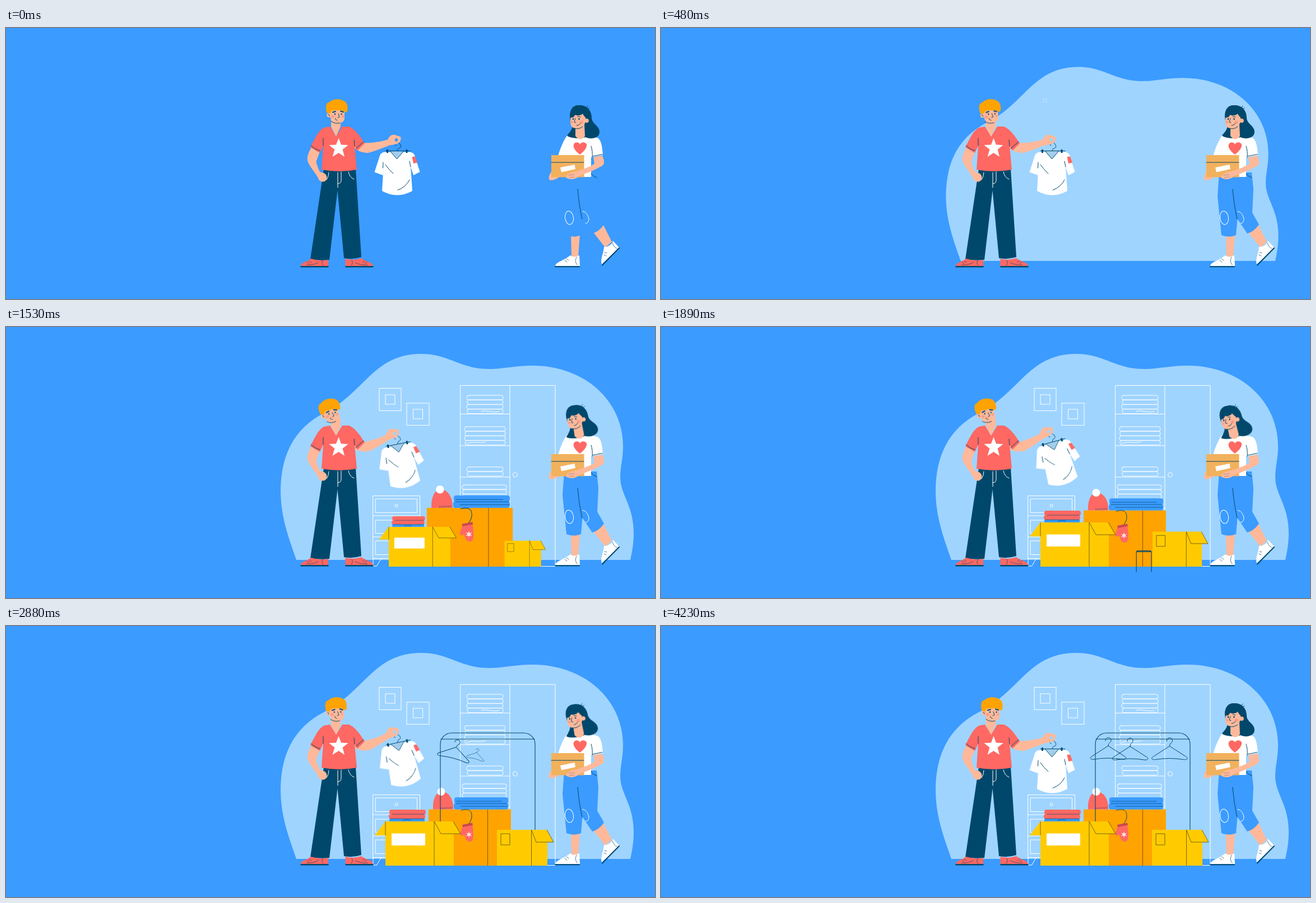
Animation, 1158 px wide and 484 px high, one loop 4500 ms. Source, as an HTML page:

```html
<!DOCTYPE html>
<html lang="en">
<head>
<meta charset="utf-8">
<title>Sorting clothes</title>
<style>
  html, body { margin: 0; width: 100%; height: 100%; overflow: hidden; background: #3b9bff; }
  svg { display: block; width: 100%; height: 100%; }
  .navy { fill: #00486b; }
  .coral { fill: #ff6863; }
  .skin { fill: #ffb99a; }
  .white { fill: #fff; }
  .blue { fill: #3b9bff; }
  .orange { fill: #ffa300; }
  .yellow { fill: #ffcb00; }
  .ink { fill: none; stroke: #00486b; stroke-width: 1; stroke-linecap: round; stroke-linejoin: round; }
  .chalk { fill: none; stroke: #fff; stroke-width: 1; stroke-linecap: round; }
  .edge { fill: none; stroke: #5a4a10; stroke-width: .8; }
  .thin { stroke-width: .7; }
  .bold { stroke-width: 2; }
  .rail { stroke-width: 1.1; vector-effect: non-scaling-stroke; }

  .sway { animation: 4500ms infinite; animation-timing-function: cubic-bezier(.37, 0, .63, 1); }
  #manHead { transform-origin: 588px 200px; animation-name: manHead; }
  #forearm { transform-origin: 640px 212px; animation-name: forearm; }
  #heldShirt { transform-origin: 700px 200px; animation-name: heldShirt; }
  #womanHead { transform-origin: 1030px 203px; animation-name: womanHead; }
  @keyframes manHead {
    0% { transform: rotate(0deg); }
    32% { transform: rotate(-13.5deg); }
    73%, 100% { transform: rotate(0deg); }
  }
  @keyframes forearm {
    0%, 10.5% { transform: rotate(0deg); }
    49% { transform: rotate(-15deg); }
    92%, 100% { transform: rotate(0deg); }
  }
  @keyframes heldShirt {
    0%, 10.5% { transform: rotate(0deg); }
    49% { transform: rotate(-1.5deg); }
    92%, 100% { transform: rotate(0deg); }
  }
  @keyframes womanHead {
    0%, 10.5% { transform: rotate(0deg); }
    49% { transform: rotate(-12.5deg); }
    92%, 100% { transform: rotate(0deg); }
  }
</style>
</head>
<body>
<!-- data-pop: start in ms, then the point it grows from -->
<svg viewBox="0 0 1158 484" preserveAspectRatio="none">
  <defs>
    <path id="hanger" class="ink" d="M-5 -9C-6 -16 5 -17 5 -10C5 -5 0 -6 0 0L-28 18C-35 22 -31 25 -25 24Q0 20 25 24C31 25 35 22 28 18L0 0"/>
  </defs>

  <path data-pop="0 805 416" fill="#9fd4ff" d="M518 416C505 378 490 340 490 293C490 222 520 178 567 154C640 118 655 48 741 48C790 48 810 75 862 75C890 75 905 69 940 69C1030 69 1101 130 1101 213C1101 235 1096 250 1096 268C1096 300 1120 318 1120 368C1120 387 1117 402 1114 416Z"/>

  <g class="chalk">
    <rect data-pop="365 685.5 129.5" x="677" y="121" width="17" height="17"/>
    <rect data-pop="618 685.5 129.5" x="666" y="109.5" width="39" height="40"/>
    <rect data-pop="450 735 155.5" x="726.5" y="147" width="17" height="17"/>
    <rect data-pop="760 735 155.5" x="715" y="136" width="40" height="39.5"/>

    <g data-pop="760 697 364">
      <path d="M655 301.5H738.5V413.5H655ZM655 337H738.5M655 375H738.5M655 413V427H661.5L669.5 413.5"/>
      <path d="M659.5 307H733.5V331.5H659.5ZM659.5 345H733.5V368.5H659.5ZM659.5 382H733.5V406.5H659.5Z"/>
      <circle cx="696.5" cy="319" r="2.5"/>
    </g>

    <g data-pop="877 896 427" id="wardrobe">
      <path d="M811 104.5H980V427.5H811ZM899 104.5V427M811 155.5H899M811 212H899M811 268H899M811 323.5H899"/>
      <path d="M848 151C856 147 866 154 880 151M822 208C836 203 842 209 856 205"/>
      <circle cx="908.5" cy="264" r="4"/>
    </g>
  </g>

  <g data-pop="1190 827 428">
    <path class="orange" d="M754 327.5H901V428H754Z"/>
    <path class="edge" d="M859.5 327.5V428"/>
    <rect class="blue" x="800" y="306" width="96" height="11" rx="4"/>
    <rect class="blue" x="799" y="316" width="97" height="11.5" rx="4"/>
    <path class="ink thin" d="M804 313H884M803 317H894M811 322H895"/>
    <path class="coral" d="M762 327.5C761 310 767 296 778 296C790 296 799 310 798 327.5Z"/>
    <path class="ink thin" d="M776 324.5V326.5M779 324.5V326.5M782 324.5V326.5M785 324V326M788 324V326M791 324V326M794 323.5V325.5"/>
    <circle class="white" cx="776.5" cy="296" r="7"/>
    <path class="ink" d="M812 329C828 325 831 331 831 340C831 346 828 350 825 354"/>
    <path class="coral" d="M815 357C813 364 810 369 811 373C813 376 817 374 818 372C819 380 823 386 829 385C836 383 834 368 832 353Z"/>
    <path fill="#c9474f" d="M814 355L832 351.5L833 355.5L815 359Z"/>
    <path class="chalk" d="M826 368V377M821.8 370.2L830.2 374.8M830.2 370.2L821.8 374.8"/>
    <circle class="chalk" cx="826" cy="372.5" r="2.2"/>
  </g>

  <g data-pop="1815 862 439">
    <path class="ink rail" d="M775 428V211A20 20 0 0 1 795 191H924A20 20 0 0 1 944 211V428M776 202H943"/>
  </g>
  <g data-pop="2480 798 236" data-swing><use href="#hanger" x="798" y="214"/></g>
  <g data-pop="2743 837 237" data-swing><use href="#hanger" x="837" y="215"/></g>
  <g data-pop="3010 907.5 236" data-swing><use href="#hanger" x="907.5" y="214.5"/></g>

  <g data-pop="1100 736 428">
    <rect class="blue" x="684" y="342" width="63" height="9" rx="3"/>
    <rect class="coral" x="684" y="328" width="65" height="8.5" rx="3.5"/>
    <rect class="coral" x="683" y="336" width="65" height="8" rx="3.5"/>
    <path class="ink thin" d="M689 336H746M686 344.5H746M708 347.5Q714 345 722 347"/>
    <path class="yellow" d="M677 349H798L811 371H799V428H677V374H658Z"/>
    <path class="edge" d="M677 349V374M764 428V349L776 371H811L798 349"/>
    <rect class="white" x="688" y="370.5" width="60" height="21.5"/>
  </g>

  <g data-pop="1360 925 428">
    <path class="yellow" d="M876 364H965L977 386H966V428H876Z"/>
    <path class="edge" d="M937.5 428V364L946 386H977L965 364M883 371H899V391H883Z"/>
  </g>

  <g id="woman">
    <path class="skin" d="M1008 368L1024 368L1021 409L1009 410ZM1048 365L1066 352L1081 382L1069 392Z"/>
    <path class="white" d="M980 425C981 418 996 415 1007 406Q1013 411 1023 406L1024 425ZM1067 391C1075 391 1082 386 1083 380L1094 392L1063 422C1060 413 1066 404 1067 391Z"/>
    <path class="ink bold" d="M980 426.3H1023M1064 423.5L1094 393"/>
    <path class="ink thin" d="M1000 412L1004 415M997 415L1001 418M1018 409Q1014 417 1019 423M1068 401L1072 402M1067 405L1071 407M1082 384Q1084 391 1090 394"/>
    <path class="blue" d="M996 258L993 300L1000 370Q1014 375 1026 370L1028.5 341L1046 367Q1058 364 1067 351L1055 330L1057 288L1054 258Z"/>
    <path class="ink" d="M1020 288C1022 310 1025 328 1028 341M1043 258Q1046 265 1054 267"/>
    <ellipse class="chalk" cx="1005" cy="339" rx="7.5" ry="12" transform="rotate(-8 1005 339)"/>
    <path class="chalk" d="M1029 327.5C1036 328 1039 336 1040 341C1040 346 1037 350 1034 348.5"/>
    <path class="white" d="M1002 191C995 200 989 214 984 232L1000 250V266H1044V231L1065 227C1064 212 1062 199 1055 196L1036 192L1024 198L1014 192Z"/>
    <path class="ink" d="M1047 229L1064 225.5M1044 211Q1047 220 1046 231"/>
    <path class="coral" d="M1024 226C1016 220 1011 213 1013 208C1015 203 1022 203 1024 208C1026 203 1034 203 1036 208C1037 214 1031 221 1024 226Z"/>
    <path class="skin" d="M974 256C968 263 967 270 971 272C978 272 984 269 988 265L986 256Z"/>
    <rect x="973" y="227" width="58.5" height="39.5" fill="#f2b15d"/>
    <path class="ink" d="M973 240H1031"/>
    <path class="white" d="M989 249L1014.5 244L1016 252L991 257.5Z"/>
    <path class="skin" d="M1048 231L1064 228C1068 238 1068 243 1064 246C1050 254 1035 260 1023 264C1015 272 1005 271 999 267C1000 261 1009 257 1018 256C1030 252 1043 248 1050 242Z"/>
    <path class="ink thin" d="M1004 263L1014 262M1005 267L1014 266" opacity=".5"/>
    <g id="womanHead" class="sway">
      <path class="navy" d="M1007 165C1004 148 1010 138 1022 138C1036 137 1045 147 1045 160C1045 172 1060 174 1059 187C1057 198 1042 199 1034 195C1022 199 1004 196 1001 192C1006 186 1010 182 1011 174Z"/>
      <path class="skin" d="M1016 175L1032 172L1033 193Q1025 204 1016 193Z"/>
      <path class="skin" d="M1008 152H1034V166C1033 175 1025 180 1018 179.5C1010 179 1007 175 1007 167Z"/>
      <circle class="skin" cx="1036" cy="165.5" r="3.8"/>
      <path class="navy" d="M1006 160C1006 144 1013 138 1022 138C1036 138 1044 146 1044 160L1038 162C1033 160 1031 157 1029 153C1025 157 1019 157 1016 155C1013 159 1010 160 1006 160Z"/>
      <path class="ink" d="M1034 143Q1037 142 1038 139M1036 145L1041 143M1010 159.5L1013 158.5M1020 158L1025 159M1016 161L1014 168L1017 169M1018 174Q1023 174 1025 170M1014 179Q1022 182 1029 176"/>
      <path class="navy" d="M1011 161H1013V164H1011ZM1021.5 161H1023.5V164H1021.5Z"/>
      <circle class="coral" cx="1027" cy="168" r="2.8" opacity=".4"/>
      <circle class="coral" cx="1010" cy="168" r="2" opacity=".4"/>
    </g>
  </g>

  <g id="man">
    <g id="forearm" class="sway">
      <g id="heldShirt" class="sway">
        <path class="ink" d="M694 205Q693 209 696 210M701 205C707 211 705 214 701 215Q698 216 698 219M677 219.5H721"/>
        <path class="white" d="M676 221.5Q669 222 667 228L657.5 257.5L672.5 263L673.5 250L671 291Q698 306 725 291L722 248L727 263L738.5 257L729 227Q727 222 720 221.5Z"/>
        <path d="M686 220.5L697.5 234L709 220.5Z" fill="#a3cdec"/>
        <path class="ink" d="M686 220.5L697.5 234L709 220.5M677 244Q683 253 691 260M699 289.5Q714 284 720 271M673 240L672.5 250M720 238L722 248"/>
        <path class="coral" d="M724.5 230L730 229.5L734 240.5L727 242Z"/>
        <path class="navy" d="M679 217H682V223H679ZM713.5 217H716.5V223H713.5Z"/>
      </g>
      <path class="skin" fill-rule="evenodd" d="M622 205L638 205C650 206 668 203 681 199.5C684 193 688 190 693 190.5C698 193 703 193 704.5 195C705 200 703 205 699 206C694 209 688 208 683 210C670 215 658 220 646 223C638 223 630 221 622 215ZM696 196.5C693 197 693 202 696 203C700 203.500 701 197.500 696 196.5Z"/>
    </g>
    <path class="navy" d="M567 252L543 413Q560 416 577 414L591.5 290L603 411Q618 414 634 409L624 252Z"/>
    <path class="chalk" d="M611 257Q613 267 621 270M576 258Q576 265 572 271M592 258V285M598 257V272Q598 278 592 278"/>
    <path class="skin" d="M545 213C538 225 536 233 539 240C545 252 553 260 557 268C559 275 566 276 570 273C574 268 573 262 567 259L560 257C556 248 553 241 554 237L560 221Z"/>
    <path class="coral" d="M526 425C526 419 537 418 544 412Q560 417 575 414V425ZM605.5 425V412Q620 416 634 411C641 417 654 418 655 425Z"/>
    <path class="navy" d="M525.5 425H575.5V427.5H525.5ZM605.5 425H655.5V427.5H605.5Z"/>
    <path class="ink thin" d="M541 416L545 419M537 418L541 421M565 415Q562 421 566 424M640 415L636 419M644 417L640 421M617 415Q620 420 616 424M623 419Q632 424 645 423M557 419Q548 424 536 423"/>
    <path class="coral" d="M578 176L567 178C556 184 549 202 543 213L560 223L566 210L563 253Q594 259 626 253L622 211L627 219L640 206C632 193 622 180 612 176H600L589 194Z"/>
    <path class="ink" d="M544.5 210Q551 217 560 219M638 203L624 215.5M566 197L566 210M621 200L622 211"/>
    <path class="skin" d="M580 162H597V176L589 194L580 177Z"/>
    <path class="white" d="M593.5 196.5L598 208.4L610.6 209L600.6 217L604 230L593.5 223L582.5 230L586.4 217L576.4 209L589 208.4Z"/>
    <g id="manHead" class="sway">
      <path class="skin" d="M579 145H604V161C604 167 598 170.5 591 170.5C584 170.5 580 167 579 160Z"/>
      <circle class="skin" cx="576.5" cy="155.5" r="4"/>
      <path class="orange" d="M572 151C570 141 571 133 577 132.5C583 126 597 126 602 130C609 132 611 141 608.5 150C602 152 603 147 597 147C590 148 586 146 581 148L578 153Z"/>
      <path class="ink" d="M593 153L595 159L592 160M588 161Q586 163 591 165M580 166.5Q587 172 596 169.5M575 154Q577 154 577 157"/>
      <path class="ink bold" d="M583 150.5L588 149M597 148.5L602 150"/>
      <path class="navy" d="M586 152.5H588V155H586ZM597.5 152.5H599.5V155H597.5Z"/>
      <circle class="coral" cx="583" cy="158" r="2.6" opacity=".4"/>
      <circle class="coral" cx="601" cy="158" r="2" opacity=".4"/>
    </g>
  </g>
</svg>
<script>
  const LOOP = 4500;
  const wardrobe = document.getElementById('wardrobe');

  function foldPile(x, y, width, rows) {
    for (let i = 0; i < rows; i++) {
      const fold = document.createElementNS(wardrobe.namespaceURI, 'rect');
      const inset = i % 2;
      const box = { x: x + inset, y: y + i * 8.2, width: width - inset, height: 8.2, rx: 3.5 };
      for (const name in box) fold.setAttribute(name, box[name]);
      wardrobe.append(fold);
    }
  }
  foldPile(822, 122, 65, 4);
  foldPile(818, 178, 73, 4);
  foldPile(822, 250, 65, 2);
  foldPile(814, 282, 79, 5);

  // Plays [ms after start, value, easing] steps once per loop and holds both ends.
  function play(el, property, start, steps) {
    const frames = steps.map(([ms, value, easing = 'ease-in-out']) =>
      ({ offset: (start + ms) / LOOP, [property]: value, easing }));
    if (start > 0) frames.unshift({ ...frames[0], offset: 0 });
    frames.push({ ...frames[frames.length - 1], offset: 1 });
    el.animate(frames, { duration: LOOP, iterations: Infinity });
  }

  const SETTLE = 'cubic-bezier(.2, .25, .6, 1)';
  const POP = [[0, '0'], [288, '1.1'], [432, '0.9', SETTLE], [600, '1']];
  const SWING = [[0, '15deg'], [400, '15deg'], [700, '-8deg'], [950, '4deg'], [1150, '0deg']];

  for (const el of document.querySelectorAll('[data-pop]')) {
    const [start, x, y] = el.dataset.pop.split(' ').map(Number);
    el.style.transformOrigin = `${x}px ${y}px`;
    play(el, 'scale', start, POP);
    if ('swing' in el.dataset) play(el, 'rotate', start, SWING);
  }
</script>
</body>
</html>
```
